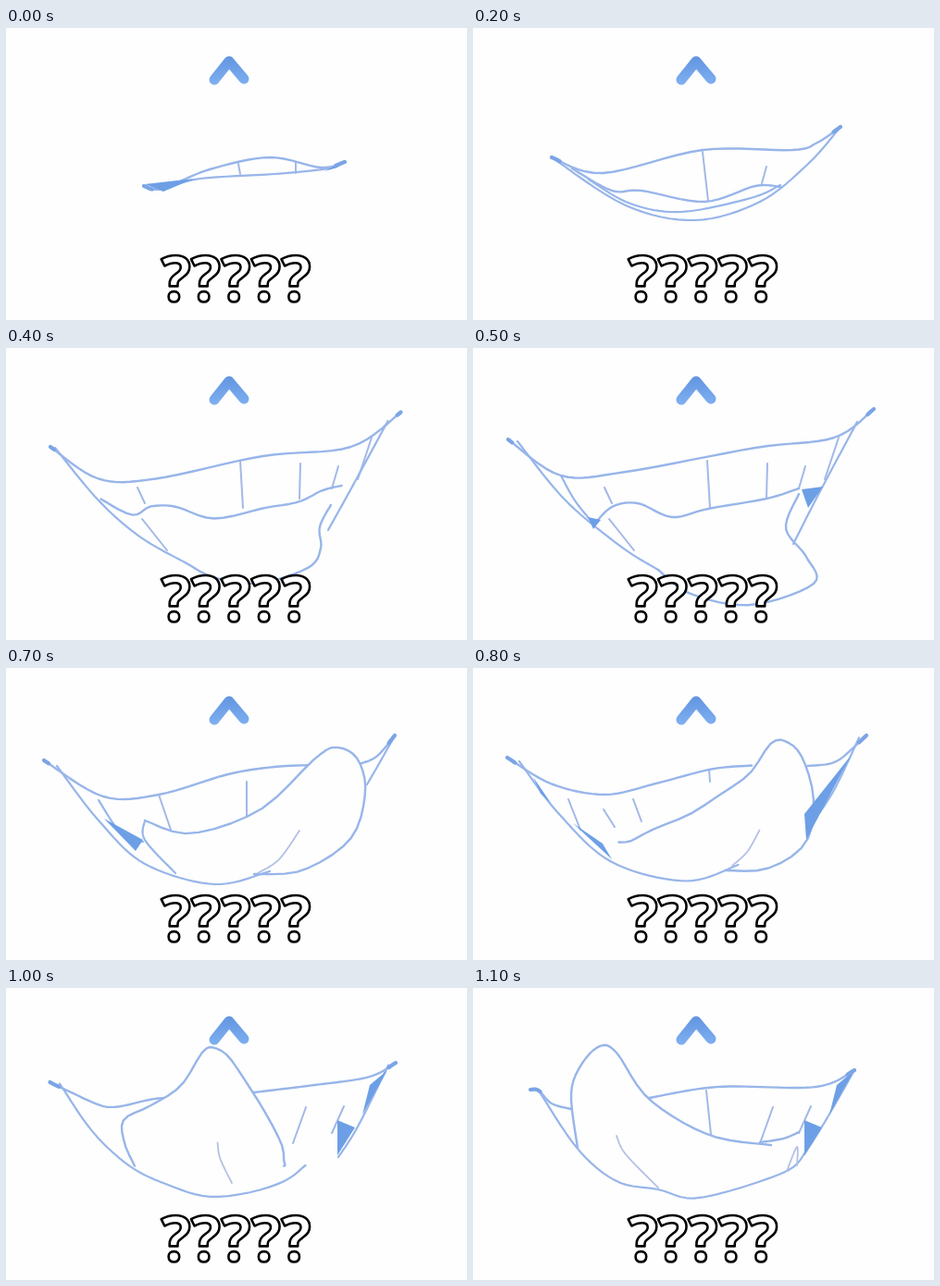
An HTML page with a canvas for the animation above (1.2 s loop, 498 by 316 pixels).

```html
<!DOCTYPE html>
<html lang="en">
<head>
<meta charset="utf-8">
<title>Grin</title>
<style>
  html, body { margin: 0; width: 100%; height: 100%; overflow: hidden; background: #fdfefd; }
  canvas { display: block; }
</style>
</head>
<body>
<canvas id="stage" width="498" height="316"></canvas>
<script>
const ctx = document.getElementById('stage').getContext('2d');
const STEP = 100, SAMPLES = 40, PAPER = '#fdfefd';

// Key poses: named curves through x, y points; teeth are straight ticks, dark holds triangles.
const closed = {
  top: [149, 171, 168, 174, 220, 153, 285, 140, 340, 151, 366, 145],
  jaw: [149, 171, 168, 174, 210, 163, 290, 158, 348, 152, 366, 145],
  teeth: [251, 147, 253, 158, 313, 145, 313, 157],
  dark: [150, 169, 170, 177, 203, 163, 344, 155, 366, 143, 358, 151],
};
const open = {
  top: [85, 140, 140, 157, 248, 132, 345, 132, 372, 124, 397, 107],
  jaw: [85, 140, 165, 192, 240, 208, 310, 188, 362, 147, 397, 107],
  edge: [107, 152, 150, 176, 182, 176, 250, 188, 305, 171, 332, 172],
  lip: [125, 164, 170, 190, 225, 199, 300, 184, 332, 170],
  teeth: [248, 134, 254, 187, 317, 150, 312, 168],
};
const grin = {
  top: [58, 115, 105, 145, 158, 149, 250, 126, 355, 117, 420, 73],
  jaw: [58, 115, 100, 165, 130, 194, 190, 226],
  tongue: [190, 226, 245, 231, 320, 207, 350, 182],
  side: [410, 78, 372, 147, 350, 182],
  edge: [75, 135, 130, 185, 150, 175, 185, 174, 235, 186, 308, 171, 340, 166, 353, 149, 373, 146],
  lip: [130, 194, 148, 190, 160, 205, 250, 220, 325, 197, 350, 170],
  teeth: [250, 126, 252, 180, 319, 123, 320, 144, 142, 161, 149, 177, 175, 162, 188, 172],
};
const out = {
  top: [38, 99, 95, 138, 165, 134, 305, 108, 390, 97, 433, 66],
  jaw: [48, 101, 100, 165, 160, 215, 200, 240],
  tongue: [200, 240, 235, 266, 300, 278, 368, 255, 360, 226, 338, 195, 352, 158],
  side: [415, 80, 375, 155, 346, 212],
  edge: [130, 192, 150, 172, 178, 168, 215, 183, 254, 174, 317, 163, 352, 152],
  cheek: [95, 138, 110, 165, 130, 190],
  teeth: [253, 122, 256, 173, 318, 125, 317, 163, 142, 151, 150, 168,
    147, 185, 174, 219, 359, 128, 352, 152, 395, 97, 380, 142],
  dark: [355, 153, 378, 150, 362, 173, 124, 183, 138, 186, 130, 196],
};
const right = {
  top: [41, 100, 105, 139, 165, 137, 240, 115, 290, 107, 332, 105],
  rim: [378, 105, 400, 96, 420, 73],
  jaw: [55, 106, 100, 165, 150, 212, 225, 234, 285, 220],
  tongue: [268, 223, 320, 219, 372, 185, 388, 135, 380, 99, 358, 86, 335, 97, 275, 153, 200, 179, 150, 165],
  side: [420, 73, 405, 100, 390, 126],
  crease: [317, 176, 295, 207, 272, 222],
  fold: [150, 165, 150, 186, 183, 222],
  cheek: [100, 143, 125, 180, 148, 188],
  teeth: [260, 123, 260, 160, 165, 137, 178, 175],
  dark: [106, 163, 148, 186, 140, 198],
};
const middle = {
  top: [33, 94, 65, 112, 120, 137, 155, 135, 225, 112, 270, 106],
  rim: [345, 107, 385, 105, 412, 86, 430, 73],
  jaw: [45, 96, 85, 150, 150, 208, 235, 227, 288, 206],
  tongue: [278, 215, 320, 214, 358, 185, 353, 125, 325, 74, 303, 65,
    285, 76, 250, 142, 195, 170, 148, 180, 148, 197, 165, 212],
  side: [414, 78, 380, 155, 360, 186],
  crease: [302, 175, 298, 190, 288, 206],
  teeth: [255, 110, 256, 123, 173, 142, 182, 166, 103, 142, 116, 175,
    141, 153, 153, 172, 364, 130, 358, 150],
  dark: [108, 168, 140, 190, 150, 207, 358, 158, 408, 95, 360, 186, 65, 118, 84, 146, 73, 136],
};
const left = {
  top: [62, 110, 71, 111, 85, 125, 106, 131],
  rim: [190, 119, 265, 107, 370, 107, 412, 89],
  jaw: [71, 111, 113, 174, 155, 209, 200, 218, 245, 227, 335, 200, 359, 178],
  tongue: [322, 170, 255, 159, 190, 120, 155, 70, 137, 63, 117, 83, 106, 115, 113, 173],
  side: [412, 89, 380, 145, 358, 180],
  crease: [155, 160, 165, 180, 200, 216],
  edge: [310, 167, 335, 163, 352, 156],
  nub: [339, 198, 350, 172, 350, 192],
  teeth: [252, 111, 257, 158, 324, 129, 310, 168, 365, 128, 352, 157],
  dark: [358, 143, 377, 151, 358, 181, 393, 105, 412, 89, 385, 137],
};

const pairs = v => v.flatMap((x, i) => i % 2 ? [] : [[x, v[i + 1]]]);
const average = (a, b) => a.map((p, i) => [(p[0] + b[i][0]) / 2, (p[1] + b[i][1]) / 2]);

// Evenly sampled Catmull-Rom curve.
function smooth(v) {
  const p = pairs(v), last = p.length - 1;
  const at = i => p[Math.max(0, Math.min(last, i))];
  return Array.from({ length: SAMPLES + 1 }, (_, k) => {
    const u = k / SAMPLES * last, i = Math.min(last - 1, Math.floor(u)), t = u - i;
    return [0, 1].map(n => {
      const [a, b, c, d] = [at(i - 1)[n], at(i)[n], at(i + 1)[n], at(i + 2)[n]];
      return b + t / 2 * (c - a + t * (2 * a - 5 * b + 4 * c - d + t * (3 * (b - c) + d - a)));
    });
  });
}

function build(shape) {
  const pose = {};
  for (const name in shape)
    pose[name] = (name === 'teeth' || name === 'dark' ? pairs : smooth)(shape[name]);
  return pose;
}

// Halfway pose; parts that cannot be paired follow the later pose.
function mix(a, b) {
  const pose = {};
  for (const name in b)
    if (a[name]) pose[name] = a[name].length === b[name].length ? average(a[name], b[name]) : b[name];
  return pose;
}

const [c, o, g, t, r, m, l] = [closed, open, grin, out, right, middle, left].map(build);
const poses = [c, mix(c, o), o, g, mix(g, t), t, mix(t, r), r, mix(r, m), m, mix(m, l), l];

function trace(points) {
  ctx.beginPath();
  points.forEach(p => ctx.lineTo(...p));
}

function line(points, width = 2.4, color = '#98b5ea') {
  if (!points) return;
  trace(points);
  ctx.lineWidth = width;
  ctx.strokeStyle = color;
  ctx.stroke();
}

// Heavier dab of pencil at the corner of the mouth.
function dab(points) {
  const [x, y] = points[0];
  line(points.filter(p => Math.hypot(p[0] - x, p[1] - y) < 11), 4.2, '#7ba4e6');
}

function drawMouth(pose) {
  const { top, rim, tongue, teeth, dark = [] } = pose;
  for (let i = 0; i < teeth.length; i += 2) line(teeth.slice(i, i + 2), 2, '#a3b8e8');
  line(top);
  line(rim);
  line(pose.edge);
  if (tongue) {
    trace(tongue);
    ctx.fillStyle = PAPER;
    ctx.fill();
    line(tongue);
  }
  for (const name of ['jaw', 'side', 'lip', 'cheek', 'fold']) line(pose[name], 2.2);
  for (const name of ['crease', 'nub']) line(pose[name], 1.8, '#b4c0e6');
  ctx.fillStyle = '#6d9fe6';
  for (let i = 0; i < dark.length; i += 3) {
    trace(dark.slice(i, i + 3));
    ctx.fill();
  }
  dab(top);
  dab([...(rim || top)].reverse());
}

function drawNose() {
  const shade = ctx.createLinearGradient(0, 30, 0, 62);
  shade.addColorStop(0, '#6294de');
  shade.addColorStop(1, '#7fb0f3');
  line([[225, 56], [241, 36], [257, 55]], 11, shade);
}

function drawCaption() {
  ctx.font = 'bold 68px "Open Sans", "Noto Sans", sans-serif';
  ctx.textAlign = 'center';
  ctx.fillStyle = '#fff';
  ctx.strokeStyle = '#000';
  ctx.lineWidth = 2.6;
  ctx.fillText('?????', 248.5, 295.5);
  ctx.strokeText('?????', 248.5, 295.5);
}

function draw(time) {
  ctx.fillStyle = PAPER;
  ctx.fillRect(0, 0, 498, 316);
  ctx.lineCap = ctx.lineJoin = 'round';
  drawMouth(poses[Math.floor(time / STEP) % poses.length]);
  drawNose();
  drawCaption();
}

const start = performance.now();
function tick() {
  draw(performance.now() - start);
  requestAnimationFrame(tick);
}
tick();
</script>
</body>
</html>
```
